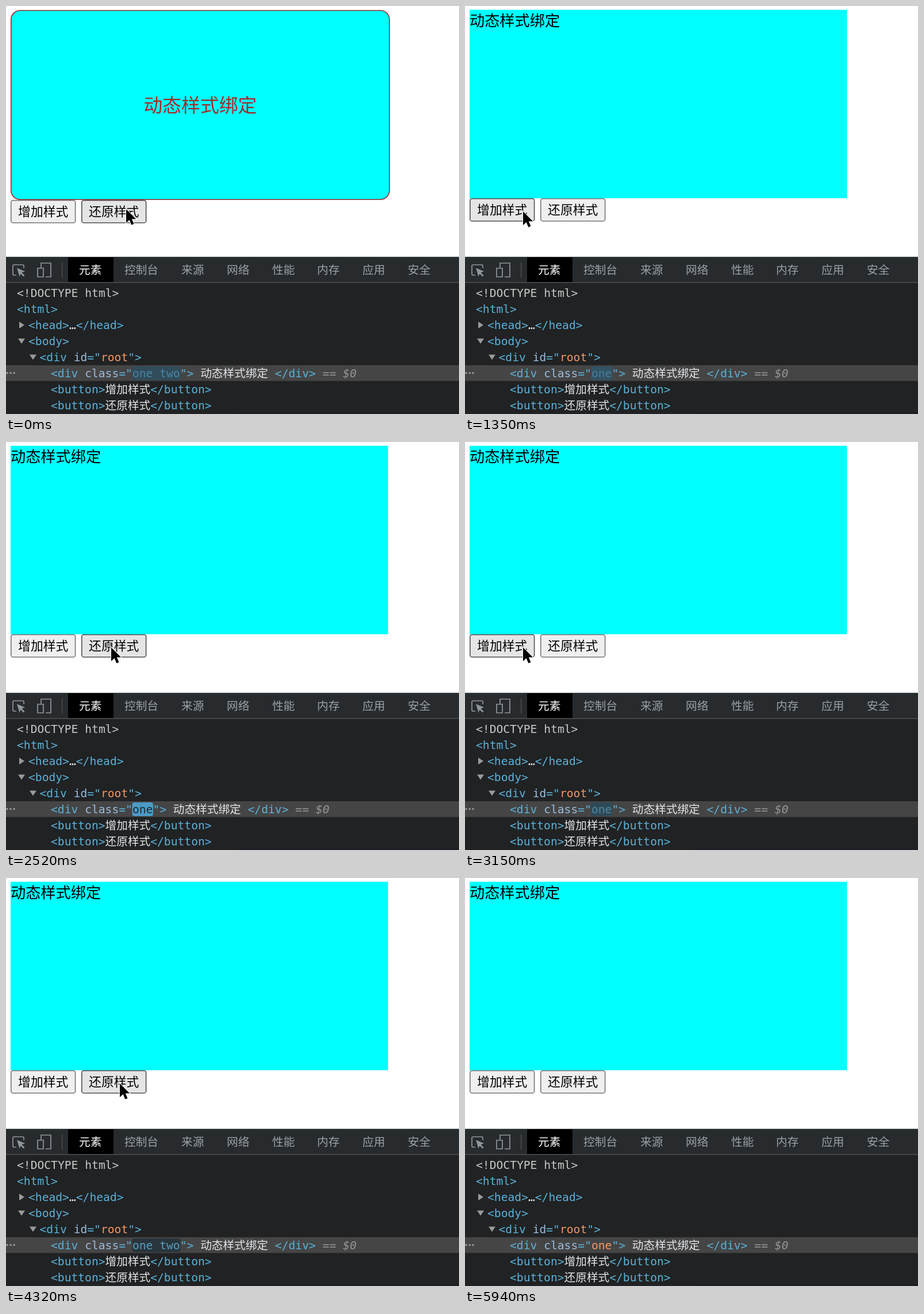
Recreate the animation shown at these times as an HTML page. Size 788x711 px, loop 6.03 s.

```html
<!DOCTYPE html>
<html lang="zh-CN">
<head>
<meta charset="utf-8">
<style>
html, body { margin: 0; width: 788px; height: 711px; overflow: hidden; background: #fff; }
svg { display: block; }
text { font-family: "Noto Sans CJK SC", "Noto Sans CJK", sans-serif; white-space: pre; }
.tabs text { font-size: 19.7px; fill: #9aa0a6; }
.code text { font-family: "DejaVu Sans Mono", "Noto Sans CJK SC", "Noto Sans CJK", monospace; font-size: 19.65px; fill: #5db0d7; }
.code .plain { fill: #e3e5e8; }
.code .name { fill: #9bbbdc; }
.code .value { fill: #f29766; }
.code .ref { fill: #959595; }
.icon { fill: none; stroke: #91969b; stroke-width: 1.7; }
.button { font-size: 21.8px; text-anchor: middle; }
.button rect { stroke-width: 1.6; }
</style>
</head>
<body>
<svg width="788" height="711" viewBox="0 0 788 711">
  <rect id="box" fill="#0ff"/>
  <text id="label">动态样式绑定</text>
  <g id="buttons">
    <g class="button"><rect x="8.8" y=".8" width="111.8" height="39" rx="3.4"/><text x="64.7" y="28">增加样式</text></g>
    <g class="button"><rect x="131.8" y=".8" width="111.8" height="39" rx="3.4"/><text x="187.7" y="28">还原样式</text></g>
  </g>

  <rect y="437" width="788" height="274" fill="#202223"/>
  <rect y="437" width="788" height="45" fill="#282b2e"/>
  <rect y="437" width="788" height="1.5" fill="#35403f"/>
  <rect y="481" width="788" height="1.6" fill="#4a4d50"/>
  <rect x="108" y="438" width="79" height="43" fill="#000"/>
  <rect x="97" y="447" width="1.3" height="26" fill="#4c5054"/>
  <g class="icon">
    <path d="M18 469h-4q-2 0-2-2v-14q0-2 2-2h15q2 0 2 2v4"/>
    <path d="M19 456.500l14 6-5.500 2 5 5-2 2-5-5-2 5z" fill="#91969b" stroke="none"/>
    <path d="M61 456v-8h17v24h-9M55 457h10v15h-10z"/>
  </g>
  <g class="tabs" id="tabs"></g>

  <rect y="626" width="788" height="27.500" fill="#454545"/>
  <g fill="#9a9a9a">
    <circle cx="2" cy="639.500" r="1.700"/><circle cx="8" cy="639.500" r="1.700"/><circle cx="14" cy="639.500" r="1.700"/>
    <path d="M23 550v12l9-6zM21 579.500h12l-6 9zM41 607.500h12l-6 9z"/>
  </g>
  <rect id="flash" x="219.500" y="628" height="24" rx="4"/>
  <g class="code">
    <text x="19" y="507" style="fill:#c8c8c8">&lt;!DOCTYPE html&gt;</text>
    <text x="19" y="535">&lt;html&gt;</text>
    <text x="39" y="563">&lt;head&gt;<tspan class="plain">…</tspan>&lt;/head&gt;</text>
    <text x="39" y="591">&lt;body&gt;</text>
    <text x="58.500" y="619">&lt;div <tspan class="name">id</tspan>="<tspan class="value">root</tspan>"&gt;</text>
    <text x="78" y="647">&lt;div <tspan class="name">class</tspan>="<tspan class="value" id="classes"></tspan>"&gt;<tspan class="plain"> 动态样式绑定 </tspan>&lt;/div&gt;<tspan class="ref"> == <tspan font-style="italic">$0</tspan></tspan></text>
    <text x="78" y="675">&lt;button&gt;<tspan class="plain">增加样式</tspan>&lt;/button&gt;</text>
    <text x="78" y="703">&lt;button&gt;<tspan class="plain">还原样式</tspan>&lt;/button&gt;</text>
  </g>
  <rect x="400" y="709" width="388" height="2" fill="#1c1d26"/>
  <path id="cursor" d="M0 0v24l5.600-5.200 3.700 8.700 4.200-1.800-3.700-8.400h7.400z" stroke="#fff" stroke-width="1.800" paint-order="stroke"/>
</svg>
<script>
const LOOP = 6030, STEP = 90, FADE = 1400;
const $ = id => document.getElementById(id);
const set = (el, attrs) => { for (const k in attrs) el.setAttribute(k, attrs[k]); };

const tabX = [127, 206, 305, 384, 463, 541, 620, 699];
'元素 控制台 来源 网络 性能 内存 应用 安全'.split(' ').forEach((word, i) => {
  const el = document.createElementNS('http://www.w3.org/2000/svg', 'text');
  set(el, { x: tabX[i], y: 467 });
  if (!i) el.style.fill = '#fff';
  el.textContent = word;
  $('tabs').append(el);
});

// Each click flips the style; the element tree follows one step later.
const clicks = [-690, 720, 1530, 2430, 3330, 4320];
// Cursor stops: time, x, y
const stops = [
  [0, 209, 354], [810, 209, 354], [1170, 101, 358], [1710, 101, 358],
  [2070, 183, 358], [2700, 183, 358], [3000, 101, 358], [3380, 101, 358],
  [3560, 183, 358], [3780, 183, 358], [4140, 198, 358], [4680, 198, 358], [4950, 800, 20]
];

const lastClick = t => clicks.filter(c => c <= t).length - 1;
const mix = (a, b, p) => `rgb(${a.map((v, i) => Math.round(v + (b[i] - v) * p))})`;

function cursorAt(t) {
  const i = stops.findIndex(s => s[0] > t);
  if (i < 0) return stops.at(-1).slice(1);
  const [t0, x0, y0] = stops[i - 1], [t1, x1, y1] = stops[i];
  const u = (t - t0) / (t1 - t0), e = u * u * (3 - 2 * u);
  return [x0 + (x1 - x0) * e, y0 + (y1 - y0) * e];
}

function drawPage(t) {
  const styled = lastClick(t) % 2 === 0;
  set($('box'), styled
    ? { x: 8.8, y: 7.8, width: 658.2, height: 329.400, rx: 15.6, stroke: 'brown', 'stroke-width': 1.6 }
    : { x: 8, y: 6.6, width: 656.5, height: 328.400, rx: 0, stroke: 'none' });
  set($('label'), styled
    ? { x: 239.5, y: 185, 'font-size': 32.8, fill: 'brown' }
    : { x: 8, y: 34.5, 'font-size': 26.2, fill: '#000' });

  const top = styled ? 338 : 335, [x, y] = cursorAt(t);
  set($('buttons'), { transform: `translate(0 ${top})` });
  [...$('buttons').children].forEach((button, i) => {
    const left = 8 + 123 * i;
    const hover = x > left && x < left + 113 && y > top && y < top + 41;
    set(button.firstChild, { fill: hover ? '#e5e5e5' : '#efefef', stroke: hover ? '#4f4f4f' : '#767676' });
  });
  set($('cursor'), { transform: `translate(${x} ${y})` });
}

function drawTree(t) {
  const n = lastClick(t - STEP), age = t - STEP - clicks[n];
  const names = n % 2 ? 'one' : 'one two';
  const p = 1 - (1 - Math.min(age / FADE, 1)) ** 2, lit = age < FADE;
  $('classes').textContent = names;
  $('classes').style.fill = lit ? mix([33, 42, 48], [93, 176, 215], p) : '';
  set($('flash'), {
    width: names.length * 11.83 + 1,
    fill: mix([75, 155, 197], [36, 38, 40], p),
    visibility: lit ? 'visible' : 'hidden'
  });
}

function frame() {
  const t = Math.floor(performance.now() % LOOP / STEP) * STEP;
  drawPage(t);
  drawTree(t);
  requestAnimationFrame(frame);
}
frame();
</script>
</body>
</html>
```
